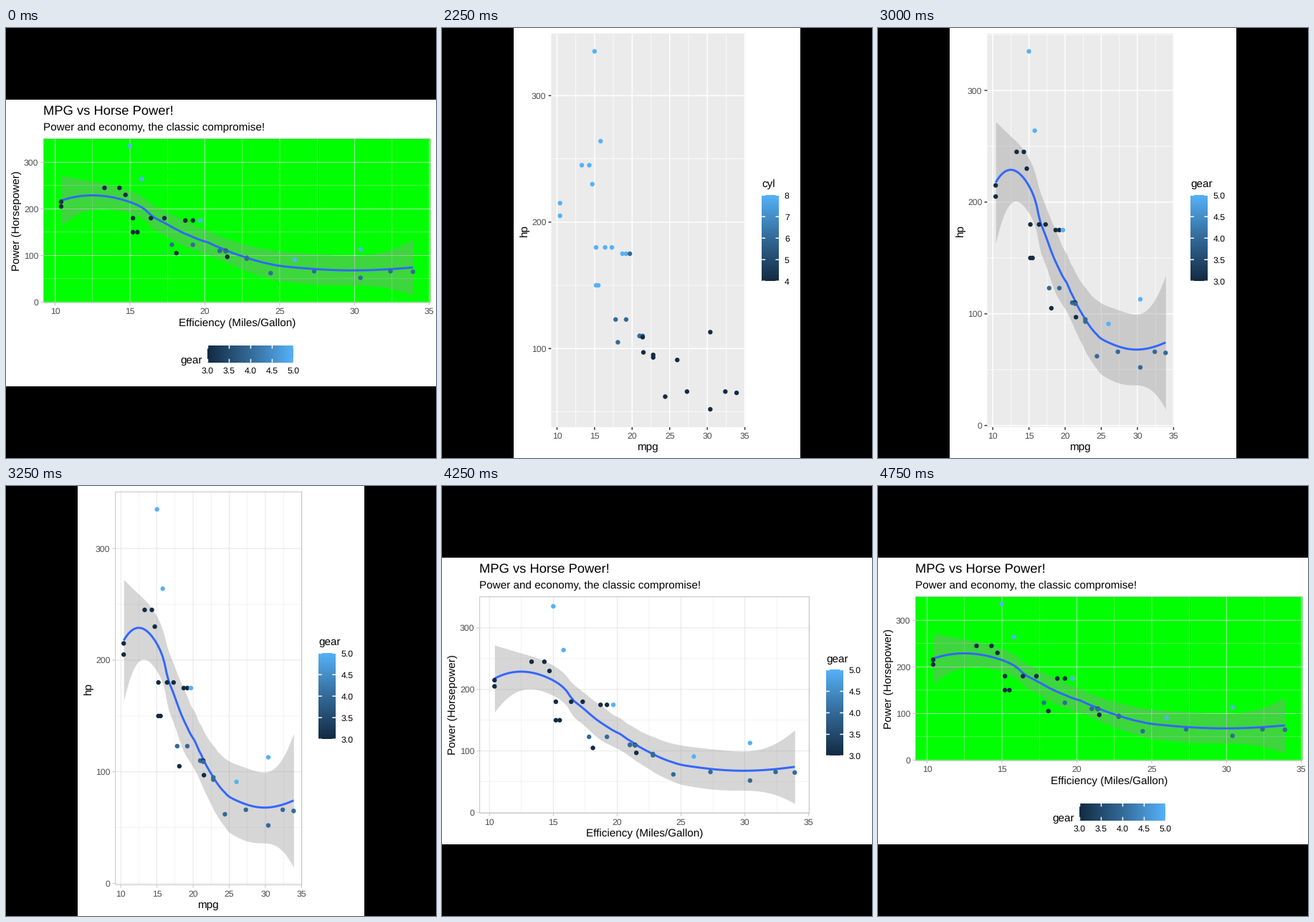
Recreate the animation shown at these times as a matplotlib script. Size 600x600 px, loop 7.75 s.

```python
import matplotlib.pyplot as plt
import numpy as np
from matplotlib.animation import FuncAnimation
from matplotlib.colors import LinearSegmentedColormap
from matplotlib.patches import Rectangle

SIZE, DPI = 600, 100
PX = DPI / 72            # pixels per point
MARGIN = 5.5 * PX
SMALL, BASE, LARGE = 8.8, 11, 13.2
ASCENT, DESCENT = 0.716, 0.212
THIN = 0.74              # line widths in pixels
THICK = 2 * THIN
BAR, KEY = 120, 24

plt.rcParams["font.family"] = "Liberation Sans"
plt.rcParams["text.hinting"] = "none"

# mpg, hp, gear, cyl
CARS = np.array([
    (21, 110, 4, 6), (21, 110, 4, 6), (22.8, 93, 4, 4), (21.4, 110, 3, 6),
    (18.7, 175, 3, 8), (18.1, 105, 3, 6), (14.3, 245, 3, 8), (24.4, 62, 4, 4),
    (22.8, 95, 4, 4), (19.2, 123, 4, 6), (17.8, 123, 4, 6), (16.4, 180, 3, 8),
    (17.3, 180, 3, 8), (15.2, 180, 3, 8), (10.4, 205, 3, 8), (10.4, 215, 3, 8),
    (14.7, 230, 3, 8), (32.4, 66, 4, 4), (30.4, 52, 4, 4), (33.9, 65, 4, 4),
    (21.5, 97, 3, 4), (15.5, 150, 3, 8), (15.2, 150, 3, 8), (13.3, 245, 3, 8),
    (19.2, 175, 3, 8), (27.3, 66, 4, 4), (26, 91, 5, 4), (30.4, 113, 5, 4),
    (15.8, 264, 5, 8), (19.7, 175, 5, 6), (15, 335, 5, 8), (21.4, 109, 4, 4),
])
MPG, HP, GEAR, CYL = CARS.T
BLUES = LinearSegmentedColormap.from_list("blues", ["#132B43", "#336A98", "#56B1F7"])
BAND_MIN = 14.5


def loess(x, y, grid, span=0.75):
    """Local quadratic fit and the norm of its weights at each grid point."""
    q = int(len(x) * span)
    fit, norm = [], []
    for g in grid:
        d = np.abs(x - g)
        h = np.sort(d)[q - 1]
        w = np.clip(1 - (d / h) ** 3, 0, None) ** 3
        X = np.vander(x - g, 3, increasing=True)
        row = np.linalg.solve(X.T @ (w[:, None] * X), (X * w[:, None]).T)[0]
        fit.append(row @ y)
        norm.append(np.linalg.norm(row))
    return np.array(fit), np.array(norm)


GRID = np.linspace(MPG.min(), MPG.max(), 80)
FIT, NORM = loess(MPG, HP, GRID)
HALF = NORM * (FIT[-1] - BAND_MIN) / NORM[-1]

fig = plt.figure(figsize=(SIZE / DPI, SIZE / DPI), dpi=DPI, facecolor="black")
ax = fig.add_axes([0, 0, 1, 1])


def text(x, y, s, size=BASE, color="black", ha="left", rotation=0):
    ax.text(x, y, s, fontsize=size, color=color, ha=ha, va="baseline",
            rotation=rotation, rotation_mode="anchor", zorder=20)


def box(x0, y0, x1, y1, z, **style):
    ax.add_patch(Rectangle((x0, y0), x1 - x0, y1 - y0, zorder=z, snap=False, **style))


def line(xs, ys, width, color, z):
    ax.plot(xs, ys, lw=width / PX, color=color, zorder=z, snap=False,
            solid_capstyle="butt")


def digits_at(y):
    return y + ASCENT * SMALL * PX / 2


def expand(lo, hi):
    pad = 0.05 * (hi - lo)
    return lo - pad, hi + pad


def breaks(lo, hi, step):
    vals = np.arange(0, 400, step)
    return [v for v in vals if lo <= v <= hi]


def bar_ticks(x, y, along, n, vertical):
    """White marks on both long sides of a colour bar."""
    for i in range(n):
        p = along * i / (n - 1)
        for a in (0, KEY * 0.8):
            side = [a, a + KEY / 5]
            if vertical:
                line([x + s for s in side], [y + p] * 2, THICK, "white", 16)
            else:
                line([x + p] * 2, [y + s for s in side], THICK, "white", 16)


def side_legend(right, mid, title, labels):
    label_w = 17 if len(labels[0]) > 1 else 6.8
    x = right - 2 * MARGIN - label_w - MARGIN - KEY
    title_h = (ASCENT + DESCENT) * BASE * PX
    top = mid - (title_h + MARGIN + BAR) / 2
    y = top + title_h + MARGIN
    text(x, top + ASCENT * BASE * PX, title)
    ax.imshow(np.linspace(1, 0, 120)[:, None], cmap=BLUES, aspect="auto", vmin=0, vmax=1,
              extent=(x, x + KEY, y + BAR, y), origin="upper", zorder=15)
    bar_ticks(x, y, BAR, len(labels), True)
    for i, s in enumerate(labels):
        ty = y + BAR - BAR * i / (len(labels) - 1)
        text(x + KEY + MARGIN, digits_at(ty), s, SMALL)
    return x - 3 * MARGIN


def bottom_legend(mid, y, title, labels):
    title_w = 30.6
    x = mid + (title_w + MARGIN + BAR) / 2 - BAR
    text(x - MARGIN - title_w, y + 24.8, title)
    ax.imshow(np.linspace(0, 1, 120)[None, :], cmap=BLUES, aspect="auto", vmin=0, vmax=1,
              extent=(x, x + BAR, y + KEY, y), origin="upper", zorder=15)
    bar_ticks(x, y, BAR, len(labels), False)
    for i, s in enumerate(labels):
        text(x + BAR * i / (len(labels) - 1), digits_at(y + 35.2), s, SMALL, ha="center")


def draw_plot(step):
    wide = step >= 9
    light = step >= 5
    smooth = step >= 3
    left, top, right, bottom = (0, 100, 600, 500) if wide else (100, 0, 500, 600)
    box(left, top, right, bottom, 0, fc="white", lw=0)

    # heading pushes the panel down
    x0, x1 = left + 52.35, right - MARGIN
    y0, y1 = top + MARGIN, bottom - 43
    heading = [("MPG vs Horse Power!", LARGE, 6),
               ("Power and economy, the classic compromise!", BASE, 7)]
    for s, size, since in heading:
        if step >= since:
            text(x0, y0 + ASCENT * size * PX, s, size)
            y0 += (ASCENT + DESCENT) * size * PX + MARGIN

    gears = ["3.0", "3.5", "4.0", "4.5", "5.0"]
    if step >= 10:
        y1 = bottom - 116.6
        bottom_legend((x0 + x1) / 2, bottom - 57.4, "gear", gears)
    elif step >= 2:
        x1 = side_legend(right, (y0 + y1) / 2, "gear", gears)
    elif step == 1:
        x1 = side_legend(right, (y0 + y1) / 2, "cyl", list("45678"))

    xlim = expand(MPG.min(), MPG.max())
    ylim = expand(BAND_MIN if smooth else HP.min(), HP.max())

    def px(v):
        return x0 + (v - xlim[0]) / (xlim[1] - xlim[0]) * (x1 - x0)

    def py(v):
        return y1 - (v - ylim[0]) / (ylim[1] - ylim[0]) * (y1 - y0)

    # panel, grid and axes
    fill = "#00FF00" if step >= 11 else "white" if light else "#EBEBEB"
    box(x0, y0, x1, y1, 1, fc=fill, lw=0)
    grid = "#DEDEDE" if light else "white"
    tick = "#B3B3B3" if light else "#333333"
    major_w = THIN if light else THICK
    for v in breaks(*xlim, 2.5):
        major = v % 5 == 0
        line([px(v)] * 2, [y0, y1], major_w if major else major_w / 2, grid, 2 + major)
        if major:
            line([px(v)] * 2, [y1, y1 + 3.8], major_w, tick, 4)
            text(px(v), y1 + 15.7, f"{v:.0f}", SMALL, "#4D4D4D", "center")
    for v in breaks(*ylim, 50):
        major = v % 100 == 0
        line([x0, x1], [py(v)] * 2, major_w if major else major_w / 2, grid, 2 + major)
        if major:
            line([x0 - 3.8, x0], [py(v)] * 2, major_w, tick, 4)
            text(x0 - 6.9, digits_at(py(v)), f"{v}", SMALL, "#4D4D4D", "right")
    named = step >= 8
    text((x0 + x1) / 2, y1 + 32.1, "Efficiency (Miles/Gallon)" if named else "mpg",
         ha="center")
    text(left + MARGIN + ASCENT * BASE * PX, (y0 + y1) / 2,
         "Power (Horsepower)" if named else "hp", ha="center", rotation=90)

    # data layers
    if step == 0:
        colors = "black"
    elif step == 1:
        colors = BLUES((CYL - 4) / 4)
    else:
        colors = BLUES((GEAR - 3) / 2)
    ax.scatter(px(MPG), py(HP), s=4.62 ** 2, c=colors, linewidths=0,
               zorder=5 if step == 3 else 9)
    if smooth:
        ax.fill_between(px(GRID), py(FIT - HALF), py(FIT + HALF), color="#999999",
                        alpha=0.4, lw=0, zorder=6)
        line(px(GRID), py(FIT), 2.96, "#3366FF", 7)
    if light:
        h = THIN / 2
        box(x0 + h, y0 + h, x1 - h, y1 - h, 10, fill=False, ec="#B3B3B3", lw=THIN / PX)


def update(i):
    ax.clear()
    ax.axis("off")
    draw_plot(i - 8 if 8 <= i < 19 else 11)
    ax.set_xlim(0, SIZE)
    ax.set_ylim(SIZE, 0)
    return []


anim = FuncAnimation(fig, update, frames=31, interval=250, init_func=lambda: [],
                     repeat=True, repeat_delay=0)
plt.show()
```
